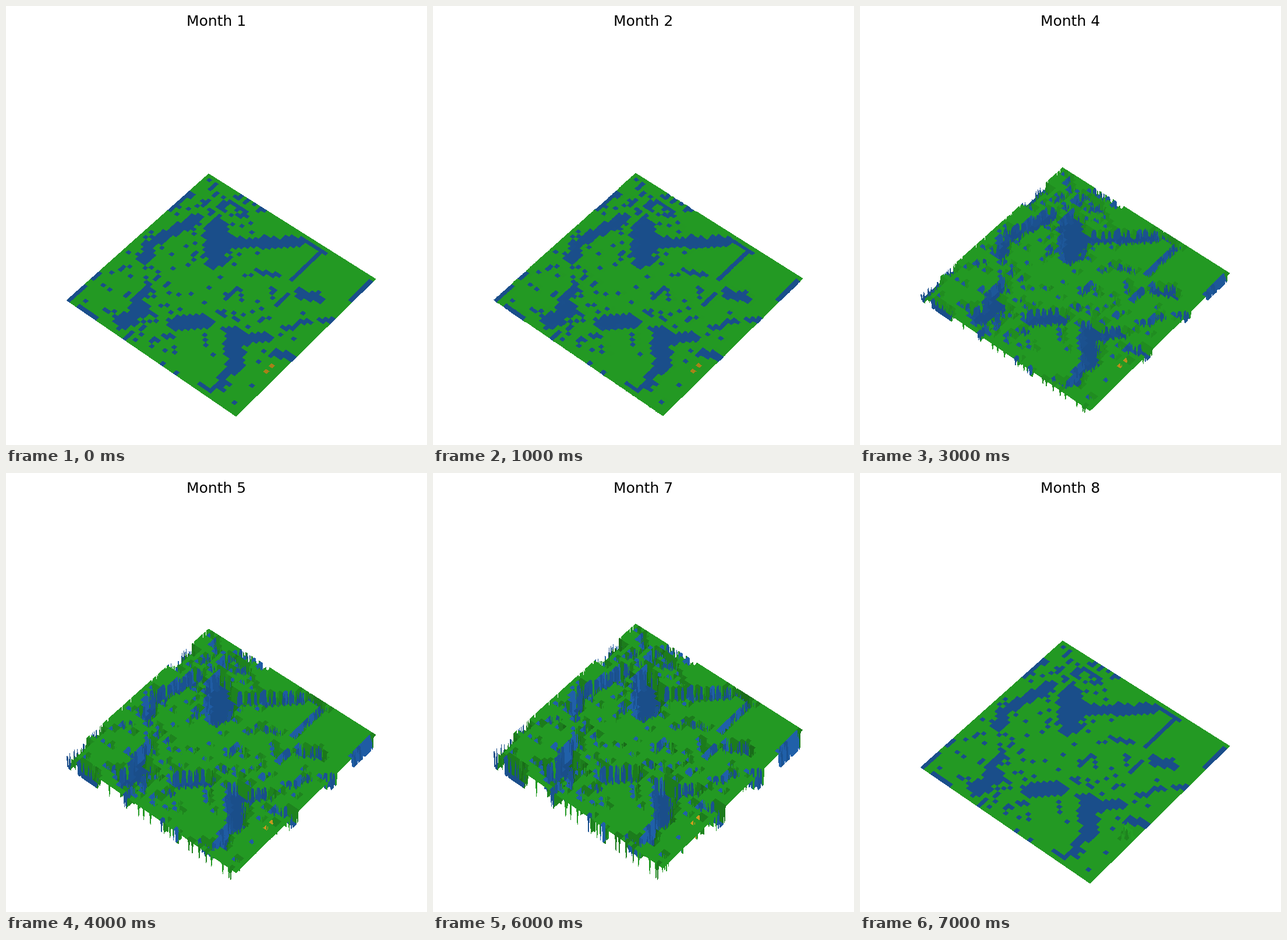
These frames come from a looping animation (723 by 754 pixels, 8000 ms). A matplotlib script:

```python
import numpy as np
import matplotlib.pyplot as plt
from matplotlib.animation import FuncAnimation
from matplotlib.collections import PolyCollection

W, H = 723, 754
CELLS, STEP = 50, 4
FINE = CELLS * STEP
LAND, WATER, CROP = 0, 1, 2
FLAT = np.array([(35, 153, 35), (26, 78, 138), (167, 127, 25)]) / 255
FLAT_SHADE = 0.3 + 0.7 * (1 + 1 / 3) / 2
LIGHT = np.array([-2, -2, 1]) / 3

# Centre line and half width, in stage pixels
LAKES = [
    (364, 390, 361, 429, 22), (390, 408, 498, 406, 9),
    (328, 366, 256, 404, 9), (246, 412, 238, 438, 10),
    (200, 542, 236, 524, 13), (240, 488, 222, 508, 8),
    (292, 546, 344, 543, 13), (394, 566, 392, 616, 16),
    (410, 574, 446, 570, 9), (382, 632, 368, 648, 9),
    (460, 598, 488, 603, 8), (504, 494, 538, 503, 9),
]
# Centre lines of channels one cell wide
STREAMS = [
    (318, 323, 285, 349), (136, 485, 112, 503), (130, 518, 155, 534),
    (508, 401, 548, 423), (538, 425, 495, 467), (628, 474, 594, 505),
    (464, 516, 488, 496), (430, 457, 466, 464), (484, 556, 516, 541),
    (333, 650, 358, 662), (538, 538, 562, 542), (380, 497, 402, 487),
]
# Centre, spread in x and y, share of wet cells
MARSHES = [(385, 345, 58, 20, 0.5), (230, 520, 45, 55, 0.3), (400, 535, 70, 30, 0.15)]
MEADOW = (560, 455)
CROPS = [(455, 617), (444, 628)]
STUBBLE = (455, 622)


def project(col, row):
    """Perspective map of the unit square onto the tilted ground."""
    right, top, left, bottom = np.array(
        [(634.5, 469), (348, 288.5), (104.5, 505.5), (395, 704.5)])
    cross = lambda p, q: p[0] * q[1] - p[1] * q[0]
    a, b, s = top - left, bottom - left, right - top + left - bottom
    g, h = cross(s, b) / cross(a, b), cross(a, s) / cross(a, b)
    col, row = col[..., None], row[..., None]
    num = right + col * (top - right + g * top) + row * (bottom - right + h * bottom)
    return num / (1 + g * col + h * row)


def segment_distance(points, x0, y0, x1, y1):
    start, span = np.array([x0, y0]), np.array([x1 - x0, y1 - y0])
    t = np.clip((points - start) @ span / (span @ span), 0, 1)
    return np.linalg.norm(points - start - t[..., None] * span, axis=-1)


def build_cells(rng):
    mid = (np.arange(CELLS) + 0.5) / CELLS
    centers = project(*np.meshgrid(mid, mid))
    x, y = centers[..., 0], centers[..., 1]

    open_land = np.hypot(x - MEADOW[0], y - MEADOW[1])
    chance = 0.06 * np.clip(open_land / 90 - 0.6, 0, 1)
    for mx, my, sx, sy, share in MARSHES:
        chance += share * np.exp(-((x - mx) / sx) ** 2 - ((y - my) / sy) ** 2)
    wet = rng.random(x.shape) < chance

    ragged = rng.normal(1, 0.12, x.shape)
    for *line, radius in LAKES:
        wet |= segment_distance(centers, *line) < radius * ragged
    for line in STREAMS:
        wet |= segment_distance(centers, *line) < 4

    kind = np.where(wet, WATER, LAND)
    for px, py in CROPS:
        kind.flat[np.argmin(np.hypot(x - px, y - py))] = CROP
    return kind


def build_growth(kind, rng):
    """Which fine grid points carry plants: blurred cells, noisy at the shores."""
    bare = np.pad((kind != LAND).astype(float), (0, 1), mode="edge")
    offset = abs(np.arange(FINE + 1)[:, None] / STEP - np.arange(CELLS + 1))
    blur = lambda width: np.maximum(0, 1 - offset / width) / width
    soft = blur(1) @ bare @ blur(1).T
    wide = blur(2) @ bare @ blur(2).T
    spread = 0.12 + 1.3 * wide * (1 - wide)
    dry = soft + rng.normal(size=soft.shape) * spread < 0.55
    dry[:FINE:STEP, :FINE:STEP] = kind == LAND
    dry[-1] &= rng.random(FINE + 1) > 0.08
    dry[:, -1] &= rng.random(FINE + 1) > 0.08
    return dry.astype(float)


rng = np.random.default_rng(7)
kind = build_cells(rng)
growth = build_growth(kind, rng)

axis = np.arange(FINE + 1) / FINE
gcol, grow = np.meshgrid(axis, axis)
ground = project(gcol, grow)
lift = 1 + 0.06 * (gcol - grow)
near = np.linalg.norm(ground - STUBBLE, axis=-1) < 13
stubble = near * (rng.random(near.shape) < 0.25) * 12.0

# Perimeter of every cell, starting at its right corner
k = np.arange(STEP)
rim_col = np.concatenate([k, 0 * k + STEP, STEP - k, 0 * k])
rim_row = np.concatenate([0 * k, k, 0 * k + STEP, STEP - k])
r0, c0 = np.divmod(np.arange(CELLS * CELLS), CELLS)
rows = STEP * r0[:, None] + rim_row
cols = STEP * c0[:, None] + rim_col
order = np.argsort(ground[rows, cols, 1].mean(1))
rows, cols, kinds = rows[order], cols[order], kind.ravel()[order]


def shade(z):
    n = rows.shape[1]
    pts = np.stack([cols, rows, z[rows, cols] / 9], axis=-1).astype(float)
    p, q, s = pts[:, 0], pts[:, n // 3], pts[:, 2 * n // 3]
    normal = np.cross(p - q, q - s)
    normal /= np.linalg.norm(normal, axis=1)[:, None]
    return (0.3 + 0.35 * (1 + normal @ LIGHT)) / FLAT_SHADE


def plant_height(month):
    """Logistic growth in pixels."""
    if month == 1:
        return 0
    odds = 0.141 * 3.9 ** (month - 3)
    return 28.3 * odds / (1 + odds)


fig = plt.figure(figsize=(W / 100, H / 100), dpi=100, facecolor="white")
ax = fig.add_axes([0, 0, 1, 1])
ax.set(xlim=(0, W), ylim=(H, 0))
ax.axis("off")
surface = PolyCollection([], edgecolors="none", linewidths=0, antialiaseds=False)
ax.add_collection(surface, autolim=False)
title = ax.text(361.5, 34, "", fontsize=18, family="DejaVu Sans",
                ha="center", va="baseline", color="black")


def draw(frame):
    month = frame + 1
    harvested = month == 8
    z = stubble if harvested else growth * plant_height(month)
    verts = ground[rows, cols].copy()
    verts[..., 1] -= (z * lift)[rows, cols]
    shown = np.where(harvested & (kinds == CROP), LAND, kinds)
    surface.set_verts(verts)
    surface.set_facecolor(np.clip(FLAT[shown] * shade(z)[:, None], 0, 1))
    title.set_text(f"Month {month}")
    return surface, title


anim = FuncAnimation(fig, draw, frames=8, interval=1000, repeat=True, repeat_delay=0)
plt.show()
```
